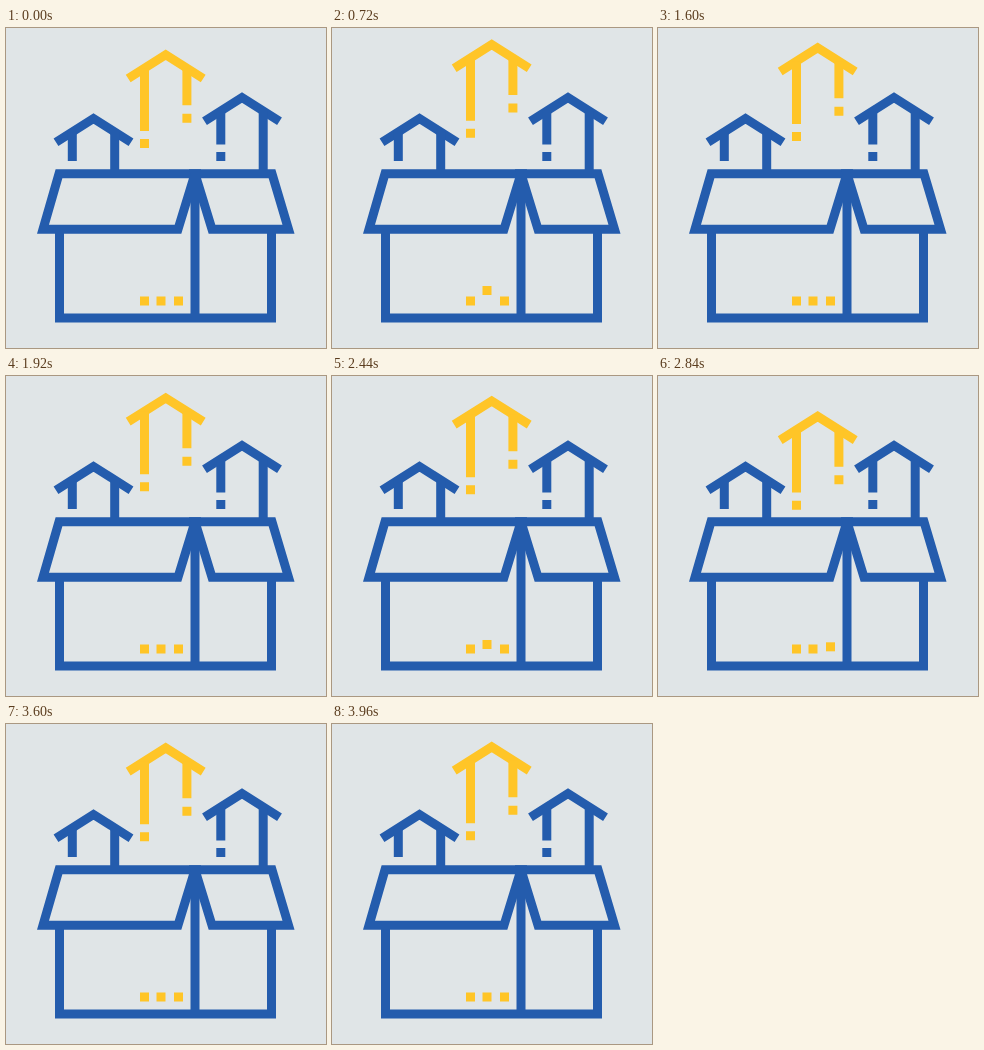
These frames come from a looping animation (320 px wide and 320 px high, 4000 ms). An HTML page:

```html
<!DOCTYPE html>
<html lang="en">
<head>
<meta charset="utf-8">
<title>Box with arrows</title>
<style>
  html, body { margin: 0; width: 100%; height: 100%; overflow: hidden; background: #e0e5e7; }
  svg { display: block; width: 100vw; height: 100vh; }
  .line { fill: none; stroke: #245cad; stroke-width: 9; }
  .gold { stroke: #ffc527; }
  .dot { fill: #ffc527; }
</style>
</head>
<body>
<svg viewBox="0 0 320 320">
  <defs>
    <path id="roof" d="M-37.5 23.7L0 0L37.5 23.7"/>
    <clipPath id="aboveBox"><rect width="320" height="142"/></clipPath>
  </defs>

  <g clip-path="url(#aboveBox)">
    <g id="arrow" class="line gold">
      <use href="#roof"/>
      <path d="M-21.2 13.4V76.2M-21.2 84.3v9M21.2 13.4V50.4M21.2 58.9v9"/>
    </g>
  </g>

  <g class="line">
    <g transform="translate(87.5 90.5)">
      <use href="#roof"/>
      <path d="M-21.2 13.4V42.5M21.2 13.4V52"/>
    </g>
    <g transform="translate(236 69.5)">
      <use href="#roof"/>
      <path d="M-21.2 13.4V47M-21.2 54.5v9M21.2 13.4V73"/>
    </g>
    <path d="M53 145.7H189L172 201.2H37Z"/>
    <path d="M189 145.7H266L282.5 201.2H206Z"/>
    <path d="M53.5 201V290H265.5V201M189 146V290"/>
  </g>

  <rect class="dot" x="134" y="268.5" width="9" height="9"/>
  <rect class="dot" x="150.5" y="268.5" width="9" height="9"/>
  <rect class="dot" x="168" y="268.5" width="9" height="9"/>
</svg>
<script>
  const LOOP = 4000, STEP = 40, CYCLE = 2020;
  const HOP_HEIGHT = 16;
  const TIP_OFFSET = 5.3;

  // [time in cycle, height of the arrow tip]
  const tipKeys = [[-360, 9], [215, 27], [680, 9], [1180, 153], [1660, 9], [2235, 27]];
  const hops = [[0, 410], [380, 820], [800, 1260]];

  const arrow = document.getElementById('arrow');
  const dots = document.querySelectorAll('.dot');

  function tipAt(time) {
    const next = tipKeys.findIndex(([at]) => at > time);
    const [t0, y0] = tipKeys[next - 1];
    const [t1, y1] = tipKeys[next];
    const eased = (1 - Math.cos(Math.PI * (time - t0) / (t1 - t0))) / 2;
    return y0 + (y1 - y0) * eased;
  }

  function hopAt(time, [start, end]) {
    if (time <= start || time >= end) return 0;
    return HOP_HEIGHT * Math.sin(Math.PI * (time - start) / (end - start));
  }

  function draw(now) {
    const time = Math.floor((now % LOOP) / STEP) * STEP % CYCLE;
    arrow.setAttribute('transform', `translate(159.7 ${tipAt(time) + TIP_OFFSET})`);
    dots.forEach((dot, i) => {
      dot.setAttribute('transform', `translate(0 ${-hopAt(time, hops[i])})`);
    });
  }

  let begin;
  function tick(now) {
    begin ??= now;
    draw(now - begin);
    requestAnimationFrame(tick);
  }
  draw(0);
  requestAnimationFrame(tick);
</script>
</body>
</html>
```
